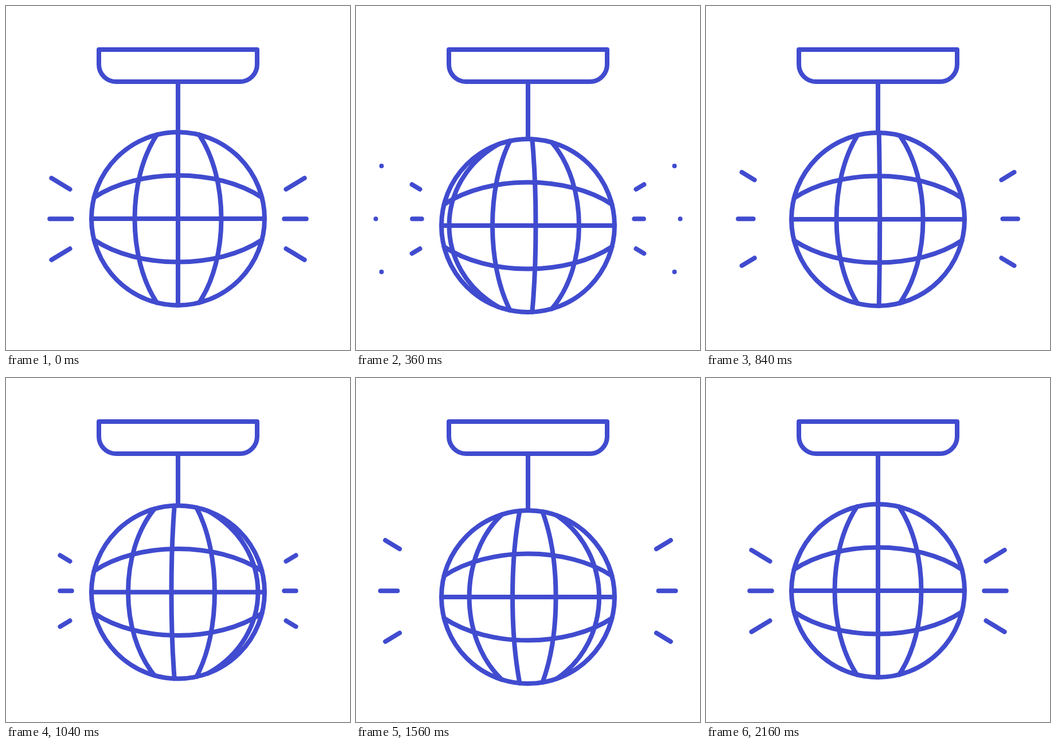
Animation, 600 px wide and 600 px high, one loop 3.76 s. Source, as an HTML page:

```html
<!DOCTYPE html>
<html lang="en">
<head>
<meta charset="utf-8">
<title>Disco ball</title>
<style>
  html, body { margin: 0; width: 100%; height: 100%; overflow: hidden; background: #fff; }
  svg { display: block; width: 100%; height: 100%; }
  svg * { fill: none; stroke: #404bcf; stroke-width: 8; stroke-linecap: round; stroke-linejoin: round; }
</style>
</head>
<body>
<svg viewBox="0 0 600 600">
  <path d="M162 76H438V102A30 30 0 0 1 408 132H192A30 30 0 0 1 162 102Z"/>
  <path id="rod"/>
  <g id="ball">
    <circle r="151"/>
    <path d="M-151 0H151"/>
    <path id="parallels"/>
    <path id="meridians"/>
  </g>
  <path id="rays"/>
</svg>
<script>
const LOOP = 3760, ACTIVE = 2160, STEP = 40, TURN = 1080;
const RADIUS = 151, GAP = 75.5, CENTER_Y = 371;

// [time, value]
const DROP = [[0, 0], [360, 12], [450, 15], [680, 8], [900, 0], [1040, 2.5],
  [1320, 13.5], [1420, 15], [1680, 6], [1800, 2.5], [2160, 0]];
const SPIN = [[0, 0], [240, 56], [360, 89], [680, 182.5], [720, 193], [1040, 290.5], [1080, 302]];

// [born, gone]: each burst grows from the ball, then its tail catches up
const BURSTS = [[-128, 310], [305, 610], [645, 940], [972, 1326],
  [1320, 1660], [1725, 1980], [2032, 2500]];
const GROWTH = 0.00375, TAIL_DELAY = 128, LINGER = 60;

// inner end and outer end of the rays on the left
const RAYS = [
  [111.5, 319.7, 44.5, 279],
  [114.7, 371.2, 34.5, 371.2],
  [111.5, 423.3, 44.5, 463.8]
];

const el = id => document.getElementById(id);
const clamp = v => Math.max(0, Math.min(1, v));
const fmt = v => v.toFixed(2);

function segment(keys, t) {
  let i = 0;
  while (i < keys.length - 2 && t >= keys[i + 1][0]) i++;
  return i;
}

function linear(keys, t) {
  const i = segment(keys, t);
  const [t0, v0] = keys[i], [t1, v1] = keys[i + 1];
  return v0 + (v1 - v0) * (t - t0) / (t1 - t0);
}

function slope(keys, i) {
  if (i === 0 || i === keys.length - 1) return 0;
  const rate = j => (keys[j + 1][1] - keys[j][1]) / (keys[j + 1][0] - keys[j][0]);
  const a = rate(i - 1), b = rate(i);
  return a * b <= 0 ? 0 : 2 * a * b / (a + b);
}

function smooth(keys, t) {
  const i = segment(keys, t);
  const [t0, v0] = keys[i], [t1, v1] = keys[i + 1];
  const h = t1 - t0, s = (t - t0) / h, r = 1 - s;
  return v0 * (1 + 2 * s) * r * r + v1 * s * s * (3 - 2 * s)
    + h * s * r * (slope(keys, i) * r - slope(keys, i + 1) * s);
}

// Curve across the ball that bulges to m at its middle
function arc(m, flip) {
  const end = 52 * Math.sin(m / 96);
  const reach = Math.sqrt(RADIUS * RADIUS - end * end);
  const bulge = (4 * m - end) / 3, pull = 60 + 0.12 * Math.abs(m);
  const p = (x, y) => flip ? `${fmt(y)} ${fmt(x)}` : `${fmt(x)} ${fmt(y)}`;
  return `M${p(end, -reach)}C${p(bulge, -pull)} ${p(bulge, pull)} ${p(end, reach)}`;
}

function meridians(shift) {
  let d = '';
  for (let i = -2; i < 2; i++) {
    const m = i * GAP + shift % GAP;
    if (Math.abs(m) < 147) d += arc(m);
  }
  return d;
}

function rays(t) {
  let d = '';
  for (const [born, gone] of BURSTS) {
    if (t < born || t > gone + LINGER) continue;
    const head = clamp((t - born) * GROWTH);
    const tail = t >= ACTIVE ? 0 : clamp((t - born - TAIL_DELAY) / (gone - born - TAIL_DELAY));
    const from = Math.min(tail, head);
    for (const [x0, y0, x1, y1] of RAYS) {
      const at = (f, right) => {
        const x = x0 + (x1 - x0) * f;
        return `${fmt(right ? 600 - x : x)} ${fmt(y0 + (y1 - y0) * f)}`;
      };
      for (const right of [false, true]) d += `M${at(from, right)}L${at(head, right)}`;
    }
  }
  return d;
}

function draw(now) {
  const t = Math.min(ACTIVE, Math.floor((now % LOOP) / STEP) * STEP);
  const y = CENTER_Y + smooth(DROP, t);
  el('ball').setAttribute('transform', `translate(300 ${fmt(y)})`);
  el('rod').setAttribute('d', `M300 132V${fmt(y - RADIUS)}`);
  el('meridians').setAttribute('d', meridians(linear(SPIN, t % TURN)));
  el('rays').setAttribute('d', rays(t));
}

el('parallels').setAttribute('d', arc(-GAP, true) + arc(GAP, true));

const start = performance.now();
function tick() {
  draw(performance.now() - start);
  requestAnimationFrame(tick);
}
tick();
</script>
</body>
</html>
```
